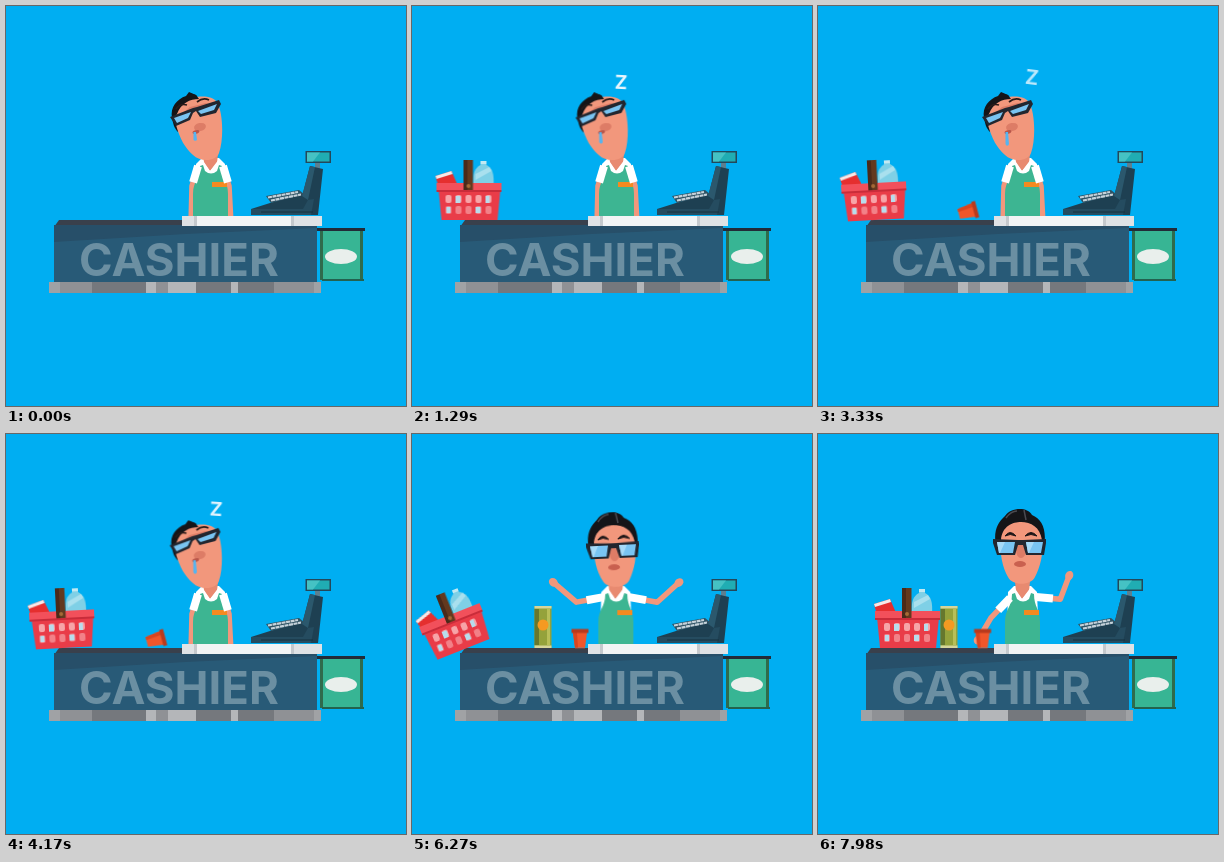
Animation of 400 by 400 pixels, one loop 8 s. Source, as an HTML page without scripts:

```html
<!DOCTYPE html>
<html lang="en">
<head>
<meta charset="utf-8">
<title>Sleepy cashier</title>
<style>
html, body { margin: 0; height: 100%; overflow: hidden; background: #00aef2; }
svg { display: block; width: 100vw; height: 100vh; }
text { font-family: Inter, Roboto, sans-serif; }
.anim { animation: 8s linear infinite both; }

/* things that drop onto the counter */
#basket { animation-name: basket; }
#cup { animation-name: cup; }
#can { animation-name: can; }
@keyframes basket {
  0%, 7% { transform: translate(64px, -50px); animation-timing-function: ease-in; }
  10.5% { transform: translate(64px, 196px); }
  11.9% { transform: translate(60px, 191px) rotate(-4deg); }
  13.25% { transform: translate(55px, 197px) rotate(-5deg); }
  16.1% { transform: translate(57.5px, 196px); }
  23.75%, 57.5% { transform: translate(57px, 196px) rotate(-3deg); }
  60.75% { transform: translate(52px, 196px) rotate(-12deg); }
  67.1% { transform: translate(50px, 196px) rotate(-13deg); }
  70.9% { transform: translate(48px, 197px) rotate(-16deg); animation-timing-function: ease-in; }
  82% { transform: translate(42px, 200px) rotate(-27deg); animation-timing-function: ease-out; }
  85%, 88.2% { transform: translate(48px, 196px) rotate(-22deg); animation-timing-function: ease-in-out; }
  93%, 100% { transform: translate(90px, 196px); }
}
@keyframes cup {
  0%, 29.1% { transform: translate(184px, -20px) rotate(-40deg); animation-timing-function: ease-in; }
  31.75% { transform: translate(184px, 85px) rotate(-90deg); animation-timing-function: ease-out; }
  34.4% { transform: translate(168px, 62px) rotate(-180deg); animation-timing-function: ease-in; }
  38.5% { transform: translate(152px, 205px) rotate(-285deg); }
  40% { transform: translate(150px, 198px) rotate(-280deg); }
  41.25%, 58% { transform: translate(150px, 205.5px) rotate(-285deg); }
  59.5% { transform: translate(160px, 194px) rotate(-330deg); }
  61%, 82% { transform: translate(168px, 204.5px) rotate(-360deg); }
  84%, 97% { transform: translate(166px, 204.5px) rotate(-360deg); }
  100% { transform: translate(164.5px, 204.5px) rotate(-360deg); }
}
@keyframes can {
  0%, 54.5% { transform: translate(131px, -30px); animation-timing-function: ease-in; }
  58% { transform: translate(131px, 193px); }
  59% { transform: translate(131px, 190px); }
  60%, 82% { transform: translate(131px, 193px); }
  84%, 88.2% { transform: translate(133px, 193px); }
  93%, 100% { transform: translate(131px, 193px); }
}

/* cashier */
#body { transform-origin: 205px 210px; animation-name: body; }
#awake { transform-origin: 205px 154px; animation-name: awake; }
#asleep, #snore { animation-name: asleep; }
#nod { transform-origin: 205px 154px; animation: nod 1.6s ease-in-out infinite alternate; }
#drool { transform-origin: 189px 126px; animation-name: drool; }
#mouth { transform-origin: 205px 137px; animation-name: mouth; }
.left { animation-name: left; }
.right { animation-name: right; }
.skin { fill: none; stroke: #f2977c; stroke-width: 5.5; stroke-linejoin: round; }
.sleeve { fill: none; stroke: #fff; stroke-width: 8; stroke-dasharray: 17 999; stroke-linejoin: round; }
@keyframes body {
  0%, 78% { transform: none; animation-timing-function: ease-in-out; }
  83.5%, 88.2% { transform: translate(-62px, 14px) rotate(-12deg); animation-timing-function: ease-in-out; }
  93% { transform: translate(-20px, 5px) rotate(-4deg); }
  96.5%, 100% { transform: none; }
}
@keyframes asleep {
  0%, 60.4% { opacity: 1; }
  60.5%, 100% { opacity: 0; }
}
@keyframes awake {
  0%, 60.4% { opacity: 0; transform: rotate(-10deg); }
  60.5% { opacity: 1; transform: rotate(-10deg); }
  62.3% { opacity: 1; transform: translate(0, -1px) rotate(5deg); }
  64%, 72% { opacity: 1; transform: none; }
  75%, 78% { opacity: 1; transform: translate(-1px, -1px) rotate(-3deg); }
  83.5%, 88.2% { opacity: 1; transform: translate(-5px, 0) rotate(3deg); }
  96.5%, 100% { opacity: 1; transform: translate(-3px, -4px); }
}
@keyframes nod { to { transform: rotate(-.8deg); } }
@keyframes drool {
  0% { transform: scaleY(.7); }
  30%, 100% { transform: scaleY(1.1); }
}
@keyframes mouth {
  0%, 72% { transform: none; }
  75%, 100% { transform: translate(0, -3px) scale(1.2, 2); }
}
@keyframes left {
  0%, 72% { d: path("M192 160L186 180L185 218"); }
  75%, 78% { d: path("M192 163L165 168L142 148"); animation-timing-function: ease-in-out; }
  83.5%, 88.2% { d: path("M122 181L100 182L75 185"); animation-timing-function: ease-in-out; }
  93% { d: path("M172 167L148 178L124 185"); }
  96.5% { d: path("M192 163L172 181L159 203"); }
  100% { d: path("M192 164L173 184L160 206"); }
}
@keyframes right {
  0%, 72% { d: path("M217 160L223 180L225 218"); }
  75%, 78% { d: path("M218 163L246 168L268 148"); animation-timing-function: ease-in-out; }
  83.5%, 88.2% { d: path("M145 178L162 187L161 203"); animation-timing-function: ease-in-out; }
  93% { d: path("M199 168L220 180L228 195"); }
  96.5% { d: path("M218 163L246 168L268 150"); }
  100% { d: path("M218 163L242 165L250 141"); }
}

/* snoring */
#snore { fill: #eaf6fd; font-weight: 700; font-size: 19px; text-anchor: middle; }
.z { animation-name: z; animation-delay: calc(.53s + var(--i) * .95s); }
@keyframes z {
  0% { opacity: 0; transform: translate(194px, 92px) scale(.4); }
  .5% { opacity: 1; }
  1.375% { opacity: 1; transform: translate(198px, 88px) scale(.75); }
  9.5% { opacity: 1; transform: translate(209px, 76px) rotate(3deg); }
  13.4% { opacity: .55; transform: translate(220px, 65px) rotate(12deg) scale(1.1); }
  17.5%, 100% { opacity: 0; transform: translate(223px, 56px) rotate(16deg) scale(1.1); }
}
</style>
</head>
<body>
<svg viewBox="0 0 400 400">
  <defs>
    <marker id="hand" viewBox="-5 -5 10 10" markerWidth="10" markerHeight="10" markerUnits="userSpaceOnUse" orient="auto">
      <ellipse rx="4.8" ry="4" fill="#f2977c"/>
    </marker>
    <g id="slots">
      <rect x="-24" width="6" height="8" rx="2"/>
      <rect x="-14" width="6" height="8" rx="2"/>
      <rect x="-4" width="6" height="8" rx="2"/>
      <rect x="6" width="6" height="8" rx="2"/>
      <rect x="16" width="6" height="8" rx="2"/>
    </g>
  </defs>
  <rect width="400" height="400" fill="#00aef2"/>

  <g id="cashier">
    <path class="anim skin left" marker-end="url(#hand)" d="M192 160L186 180L185 218"/>
    <path class="anim skin right" marker-end="url(#hand)" d="M217 160L223 180L225 218"/>
    <g id="body" class="anim">
      <path d="M196 152L190 158L188 235H222L219 158L213 152Z" fill="#fff"/>
      <path d="M197 148H212L211 157L204 165L198 157Z" fill="#e88a70"/>
      <path d="M196 153L204 165L213 153L216 158L209 169H200L192 158Z" fill="#fff"/>
      <path d="M194 160L197 159L199 165Q205 170 211 165L213 159L216 160C216 173 222 175 222 188V235H187V188C187 175 194 173 194 160Z" fill="#3db592"/>
      <rect x="206" y="176" width="15" height="5" fill="#f58a1f"/>
      <g id="awake" class="anim">
        <path d="M181 116C178 101 183 92 190 86C195 78 212 76 217 85C227 89 232 100 229 116Z" fill="#151518"/>
        <path d="M186 110C187 96 198 92 206 92C216 92 225 97 227 110C229 122 225 138 220 147C216 156 197 156 193 147C188 139 184 122 186 110Z" fill="#f2977c"/>
        <path d="M191 88Q196 81 202 81M209 80L211 90" fill="none" stroke="#4a4a50" stroke-width="1.500"/>
        <path d="M190 106Q195 99 201 106Q195 103 190 106ZM210 106Q216 99 222 106Q216 103 210 106Z" fill="#1b1416" stroke="#1b1416"/>
        <ellipse cx="206" cy="120" rx="5" ry="8" fill="#dd7c66"/>
        <path d="M178 109L203 110H208L231 109V113L229 125H211L208 115H203L200 125H182L178 113Z" fill="#22262f"/>
        <path d="M182 112H200L198 123H184ZM211 112H228L226 123H213Z" fill="#79c4f2"/>
        <path d="M182 112H190L185 123H184ZM211 112H219L214 123H213Z" fill="#a6daf8"/>
        <ellipse id="mouth" class="anim" cx="205" cy="137" rx="5" ry="1.500" fill="#c9604f"/>
      </g>
      <g id="asleep" class="anim"><g id="nod">
        <path d="M166 112C164 101 171 93 180 90L183 86L190 89L195 96L175 116L172 126C168 122 167 117 166 112Z" fill="#151518"/>
        <path d="M170 112C170 91 202 85 211 96C217 106 218 133 213 147C210 156 194 156 187 149C179 142 174 133 170 119Z" fill="#f2977c"/>
        <path d="M167 113C167 101 174 94 181 91L183 87L190 89L193 93C184 93 175 97 171 108Z" fill="#151518"/>
        <path d="M170 103Q174 97 181 99M191 96Q197 91 203 94" fill="none" stroke="#2a1a18" stroke-width="1.700"/>
        <path d="M178 106L184 101L200 97L207 99Z" fill="#dd7c66"/>
        <path d="M164 111L187 102L191 101L213 94L215 98L210 107L194 111L190 105L187 107L184 114L170 120Z" fill="#22262f"/>
        <path d="M168 112L185 106L182 112L171 117ZM192 105L211 98L208 104L195 108Z" fill="#79c4f2"/>
        <ellipse cx="194" cy="121" rx="6" ry="4" fill="#dd7c66" transform="rotate(-12 194 121)"/>
        <ellipse cx="190" cy="126" rx="3.500" ry="1.800" fill="#b8564a" transform="rotate(-15 190 126)"/>
        <path id="drool" class="anim" d="M187.500 126H190L191 137A1.800 2 0 0 1 187.500 137Z" fill="#55b4f0"/>
      </g></g>
    </g>
    <path class="anim sleeve left" d="M192 160L186 180L185 218"/>
    <path class="anim sleeve right" d="M217 160L223 180L225 218"/>
  </g>

  <g id="bag">
    <path d="M316 225H357V274H316Z" fill="#37b594"/>
    <path d="M314 225H317V274H314ZM354 225H357V274H354Z" fill="#2f6b4c"/>
    <path d="M316 273H358V275H316Z" fill="#23624f"/>
    <path d="M310 222H359V225H310Z" fill="#222b38"/>
    <ellipse cx="335" cy="250.500" rx="16" ry="7.500" fill="#e9efec"/>
  </g>

  <g id="counter">
    <path d="M53 214H180V221H48Z" fill="#39404c"/>
    <path d="M48 219H311V277H48Z" fill="#285a77"/>
    <path d="M48 219H311V222L180 228L48 236Z" fill="#274f69"/>
    <path d="M176 210H316V220H176Z" fill="#f2f4f5"/>
    <path d="M176 210H188V220H176ZM288 210H316V220H288Z" fill="#dfe2e5"/>
    <path d="M188 210H191V220H188ZM285 210H288V220H285Z" fill="#c5c9cd"/>
    <path d="M43 276H315V287H43Z" fill="#75787d"/>
    <path d="M43 276H86V287H43ZM150 276H162V287H150ZM268 276H315V287H268Z" fill="#8f9195"/>
    <path d="M140 276H150V287H140ZM162 276H190V287H162ZM225 276H232V287H225Z" fill="#b4b6b9"/>
    <path d="M43 276H54V287H43ZM308 276H315V287H308Z" fill="#a0a2a5"/>
    <text x="73" y="270" font-size="45.500" font-weight="700" fill="#6b8fa2">CASHIER</text>
  </g>

  <g id="register">
    <path d="M309 156H314V163H309Z" fill="#5d7f8f"/>
    <path d="M299.500 145H325V157H299.500Z" fill="#23485a"/>
    <path d="M301 146.500H323.500V155.500H301Z" fill="#20adb3"/>
    <path d="M301 146.500H314L307 155.500H301Z" fill="#45c2c4"/>
    <path d="M304 160L317 163L312 209H245V203L264 197L297 187Z" fill="#1e4052"/>
    <path d="M304 160L309 161L302 194L296 190Z" fill="#2b586d"/>
    <path d="M245 203H297L302 194L308 193L305 209H245Z" fill="#254c60"/>
    <path d="M260 190L293 184L298 188L265 197Z" fill="#2f5365"/>
    <path d="M262 191.500L292 186M265 194.500L295 188.500" stroke="#c5d2da" stroke-width="2.200" stroke-dasharray="4 .6"/>
    <path d="M255 206H307" stroke="#14303f"/>
  </g>

  <g id="can" class="anim">
    <path d="M-8.500 -21H8.500V21H-8.500Z" fill="#94a23b"/>
    <path d="M-8.500 -18H-4V18H-8.500Z" fill="#66772d"/>
    <path d="M4 -18H7V18H4Z" fill="#b8bf58"/>
    <path d="M-8.500 -21H8.500V-18.500H-8.500ZM-8.500 18.500H8.500V21H-8.500Z" fill="#d6d59b"/>
    <circle cy="-2" r="5.500" fill="#f59a22"/>
  </g>

  <g id="basket" class="anim">
    <path d="M-34 -26L-18 -31L-11 -15H-31Z" fill="#e52f2f"/>
    <path d="M-34 -26L-18 -31L-17 -28L-33 -23Z" fill="#f6e9e8"/>
    <path d="M11 -41H17V-37C23 -34 25 -28 24 -15H4C3 -28 5 -34 11 -37Z" fill="#7fd0e6"/>
    <path d="M11 -41H17V-38H11Z" fill="#c2e9f2"/>
    <path d="M6 -28L20 -35L22 -31L6 -22Z" fill="#a9e0ee"/>
    <path d="M-31 -13H31L28 18H-28Z" fill="#e93c48"/>
    <use href="#slots" y="-7" fill="#f7a4a8"/>
    <use href="#slots" y="4" fill="#f28188"/>
    <path d="M-14 -6H-9V1H-14ZM16 -6H20V1H16ZM-23 5H-19V11H-23ZM6 5H11V11H6Z" fill="#b8dcec"/>
    <path d="M-33 -19H32V-11H-33Z" fill="#f2505b"/>
    <path d="M-33 -12H32V-10H-33Z" fill="#c92c3a"/>
    <path d="M-6 -42H3.500V-12H-6Z" fill="#63391f"/>
    <path d="M-6 -42H-2V-12H-6Z" fill="#4a2a1a"/>
    <circle cx="-1" cy="-16" r="2" fill="#a66a36"/>
  </g>

  <g id="cup" class="anim">
    <path d="M-7 -6H7L5 9.500H-5Z" fill="#f0562a"/>
    <path d="M-7 -6H-3L-2 9.500H-5Z" fill="#d8451f"/>
    <path d="M-8.500 -9.500H8.500V-5.500H-8.500Z" fill="#b93a1d"/>
  </g>

  <g id="snore" class="anim">
    <text class="anim z" y="7" style="--i:0">Z</text>
    <text class="anim z" y="7" style="--i:1">Z</text>
    <text class="anim z" y="7" style="--i:2">Z</text>
    <text class="anim z" y="7" style="--i:3">Z</text>
    <text class="anim z" y="7" style="--i:4">Z</text>
  </g>
</svg>
</body>
</html>
```
